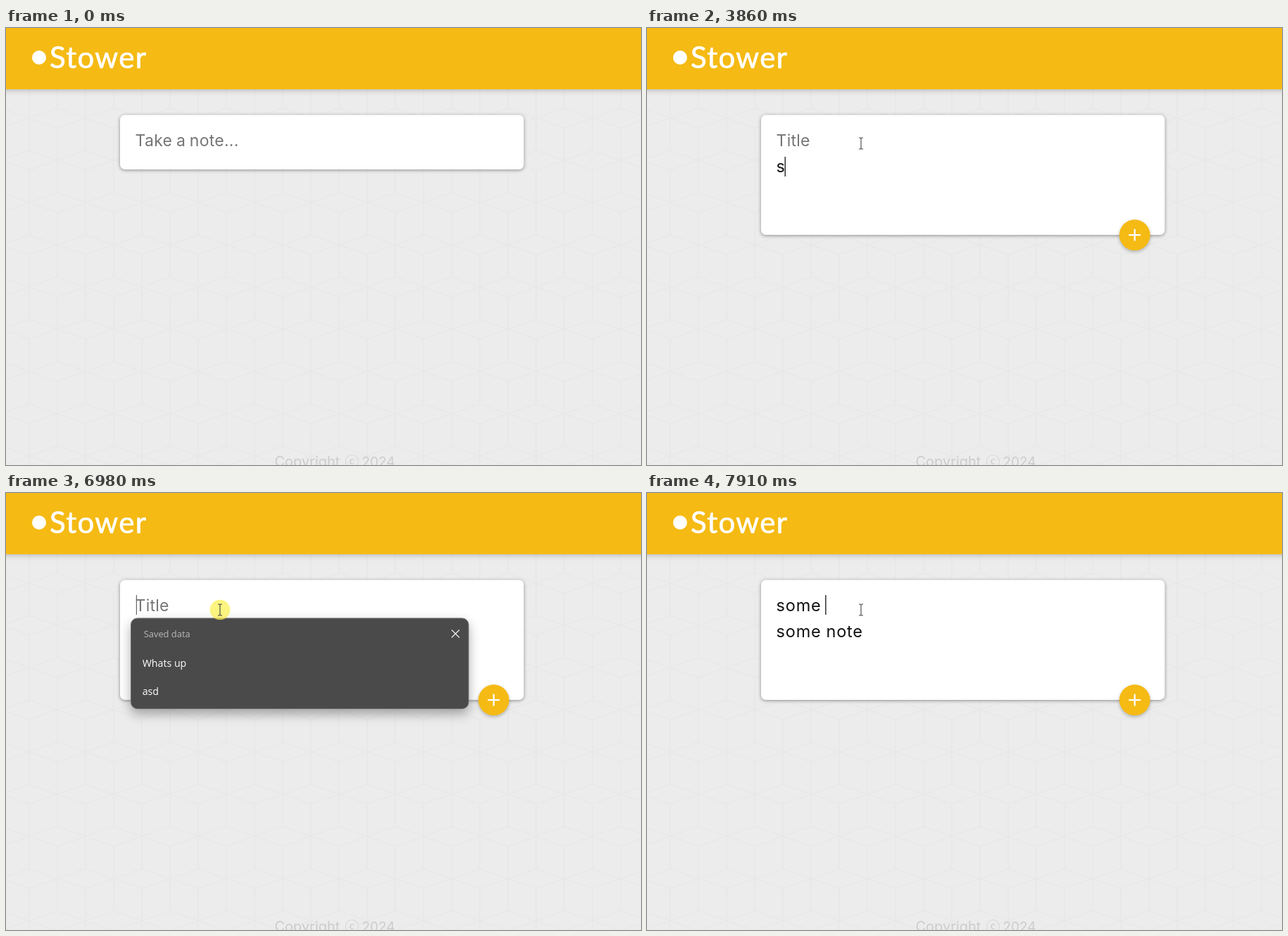
An HTML page that plays this animation: 902x621 px, repeating every 8 s.

```html
<!DOCTYPE html>
<html lang="en">
<head>
<meta charset="utf-8">
<title>Notes</title>
<style>
  html, body { margin: 0; width: 100%; height: 100%; overflow: hidden; background: #ececec; }
  svg { display: block; width: 902px; height: 621px; }
  text { white-space: pre; }
  .brand { font: 42px Lato, sans-serif; letter-spacing: 1.3px; fill: #fff; stroke: #fff; stroke-width: .7; }
  .bar { fill: #f5ba13; filter: drop-shadow(0 0 5px rgba(0,0,0,.3)); }
  .foot { font: 20px Inter, sans-serif; font-optical-sizing: none; fill: #ccc; }
  .foot .mark { font-family: "Noto Sans CJK JP", "Noto Sans CJK", sans-serif; }
  .foot .year { font-size: 19px; }
  .card { fill: #fff; filter: drop-shadow(0 1px 2.5px rgb(138,137,137)); }
  .field { font: 23.5px Inter, sans-serif; font-optical-sizing: none; fill: #111; letter-spacing: .8px; word-spacing: -.5px; }
  .field.empty { font-size: 23px; fill: #757575; letter-spacing: .25px; word-spacing: -1px; }
  .round { fill: #f5ba13; filter: drop-shadow(0 2px 2.5px rgba(0,0,0,.26)); }
  .panel { fill: #4a4a4a; stroke: #6a6a6a; filter: drop-shadow(0 7px 8px rgba(0,0,0,.32)); }
  .list { font: 14.2px "Open Sans", "Noto Sans", sans-serif; fill: #fff; }
  .list .head { font-size: 12.9px; fill: #b8b8b8; }
</style>
</head>
<body>
<svg viewBox="0 0 902 621">
  <defs>
    <pattern id="cubes" width="80" height="120" patternUnits="userSpaceOnUse" patternTransform="translate(33 114)">
      <path fill="none" stroke="#e7e7e7" stroke-width="1.3"
        d="M0 14L40 0L80 14L40 28ZM0 60L40 74L80 60M0 88L40 74L80 88M40 28V120M0 0V60M0 88V120M80 0V60M80 88V120"/>
    </pattern>
  </defs>
  <rect width="902" height="621" fill="#ececec"/>
  <rect width="902" height="621" fill="url(#cubes)"/>

  <g class="foot">
    <text x="381.5" y="623">Copyright</text>
    <text class="mark" x="481.5" y="623.6">ⓒ</text>
    <text class="year" x="505.5" y="623">2024</text>
  </g>

  <rect class="bar" x="-10" y="-10" width="922" height="97"/>
  <circle cx="47" cy="42" r="10" fill="#fff"/>
  <text class="brand" x="62" y="57">Stower</text>

  <rect id="card" class="card" x="162" y="123.5" width="573.5" height="77.5" rx="7"/>
  <text id="title" class="field" x="183.6" y="168"></text>
  <text id="note" class="field" x="183.6" y="205"></text>
  <rect id="caret" width="1.2" height="28"/>

  <g id="add">
    <circle class="round" r="21.9"/>
    <path d="M-8.4 0H8.4M0-8.4V8.4" stroke="#fff" stroke-width="2.3"/>
  </g>

  <g id="popup" class="list">
    <rect class="panel" x="177.5" y="178" width="479.5" height="128.5" rx="9"/>
    <text class="head" x="195.7" y="205">Saved data</text>
    <text x="193.7" y="247">Whats up</text>
    <text x="193.7" y="287">asd</text>
    <path d="M633 194.5l11 11m0-11l-11 11" stroke="#f0f0f0" stroke-width="1.2"/>
  </g>

  <g id="pointer">
    <circle id="press" r="14.3" fill="#faf04f" opacity=".72"/>
    <path id="beam" fill="none" stroke="#444" stroke-width="1.1"
      d="M-3-8h1.5q1.5 0 1.5 1.5v13q0 1.5-1.5 1.5H-3M3-8H1.5Q0-8 0-6.5M3 8H1.5Q0 8 0 6.5"/>
    <path id="arrow" fill="#222" stroke="#fff" stroke-width=".9" d="M0 0V17L4.6 12.2H11Z"/>
  </g>
</svg>
<script>
const LOOP = 8000, APPEAR = 180, OPEN = 2380, ADD = 2460, FOCUS = 6980, RETYPE = 7380;
const KEY = 130, BLINK = 550, LEFT = 183.6;
const phrase = "some note";

const el = {};
for (const node of document.querySelectorAll("[id]")) el[node.id] = node;

const keys = (from, count) => Array.from({ length: count }, (_, i) => from + i * KEY);
const noteKeys = [3860, ...keys(5110, phrase.length - 1)];
const titleKeys = keys(RETYPE, 5);
const carets = [OPEN, ...noteKeys, FOCUS, ...titleKeys];

const glides = [
  { from: 680, time: 300, x: 321, y: 167 },
  { from: 1920, time: 190, x: 304, y: 164 },
  { from: 5500, time: 20, x: 304, y: 166 }
];

const progress = (t, from, time) => Math.min(1, Math.max(0, (t - from) / time));
const easeOut = p => 1 - (1 - p) ** 2;
const within = (t, a, b) => t >= a && t < b;
const show = (node, on) => node.setAttribute("visibility", on ? "visible" : "hidden");
const typed = (times, t) => phrase.slice(0, times.filter(k => k <= t).length);

function fill(node, value, hint) {
  node.textContent = value || hint;
  node.setAttribute("class", value ? "field" : "field empty");
}

function drawCaret(t, node, value) {
  const last = carets.filter(k => k <= t).pop();
  const width = value ? node.getComputedTextLength() - 1.2 : 1.2;
  el.caret.setAttribute("x", LEFT + width);
  el.caret.setAttribute("y", node === el.title ? 145 : 183);
  el.caret.setAttribute("fill", value ? "#000" : "#666");
  show(el.caret, t >= OPEN && Math.floor((t - last) / BLINK) % 2 === 0);
}

function drawPopup(t) {
  const p = progress(t, RETYPE, 150), zoom = 1 - .055 * p;
  show(el.popup, t >= FOCUS && p < 1);
  el.popup.setAttribute("opacity", 1 - p);
  el.popup.setAttribute("transform", `translate(417 242.3) scale(${zoom}) translate(-417 -242.3)`);
}

function drawPointer(t) {
  const fly = easeOut(progress(t, APPEAR, 410));
  let x = 803 - 540 * fly, y = 592 - 425 * fly;
  for (const g of glides) {
    const p = easeOut(progress(t, g.from, g.time));
    x += (g.x - x) * p;
    y += (g.y - y) * p;
  }
  const isArrow = y > 201 || within(t, RETYPE, RETYPE + KEY);
  el.pointer.setAttribute("transform", `translate(${x} ${y})`);
  show(el.arrow, t >= APPEAR && isArrow);
  show(el.beam, t >= APPEAR && !isArrow);
  show(el.press, within(t, OPEN - 70, OPEN) || within(t, FOCUS, FOCUS + 60));
}

function draw(t) {
  const open = t >= OPEN;
  const note = typed(noteKeys, t), title = typed(titleKeys, t);

  el.card.setAttribute("height", open ? 170.5 : 77.5);
  fill(el.title, title, open ? "Title" : "Take a note...");
  fill(el.note, note, open ? "Take a note..." : "");
  if (t < FOCUS) drawCaret(t, el.note, note);
  else drawCaret(t, el.title, title);

  const size = easeOut(progress(t, ADD, 200));
  show(el.add, size > 0);
  el.add.setAttribute("transform", `translate(692.8 294.2) scale(${size})`);

  drawPopup(t);
  drawPointer(t);
}

const start = performance.now();
function tick() {
  draw((performance.now() - start) % LOOP);
  requestAnimationFrame(tick);
}
draw(0);
requestAnimationFrame(tick);
</script>
</body>
</html>
```
